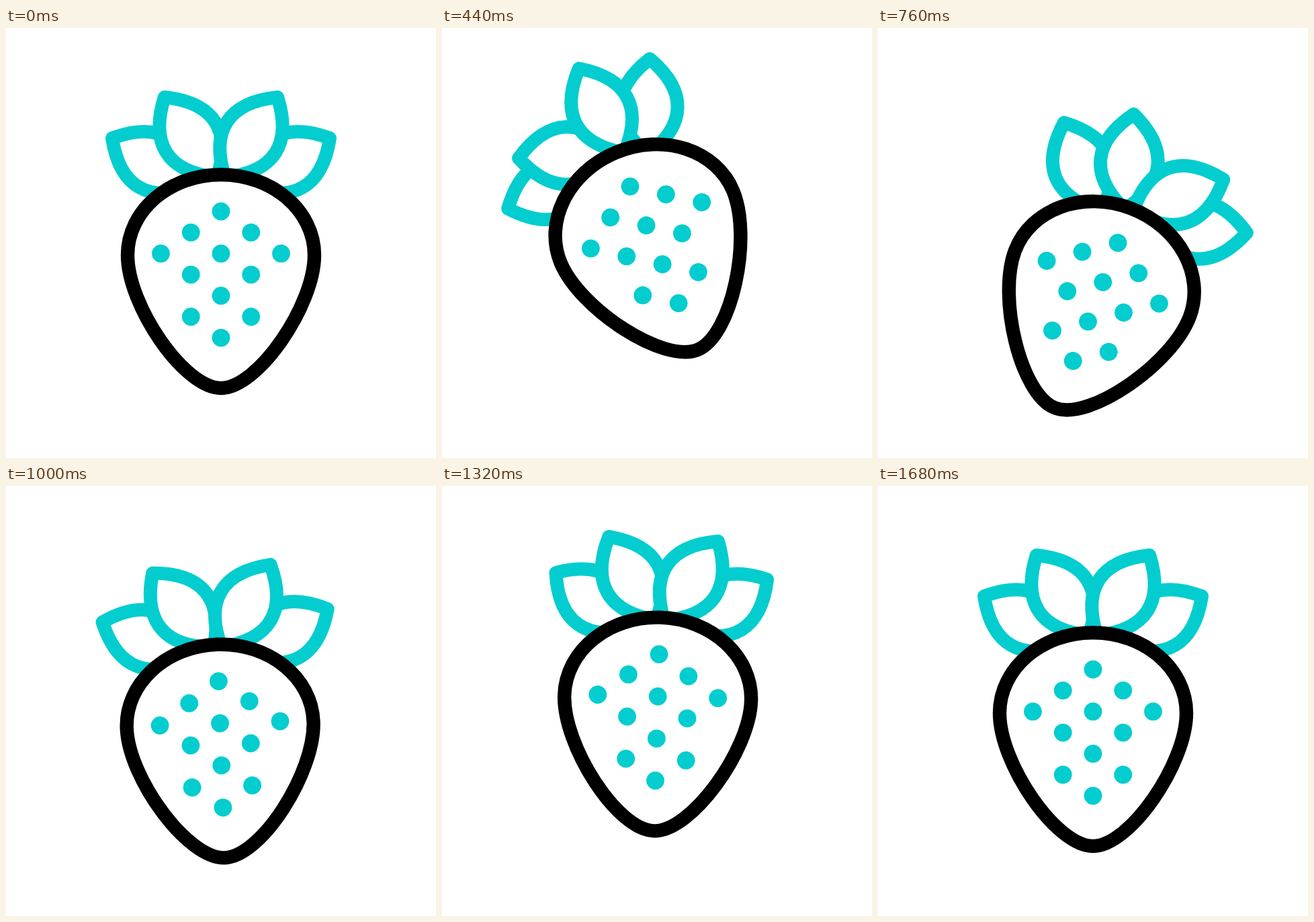
Animation, 640 px wide and 640 px high, one loop 2000 ms. Source, as an HTML page:

```html
<!DOCTYPE html>
<html lang="en">
<head>
<meta charset="utf-8">
<title>Strawberry</title>
<style>
  html, body { margin: 0; width: 100%; height: 100%; overflow: hidden; background: #fff; }
  svg { display: block; width: 100%; height: 100%; }
</style>
</head>
<body>
<svg viewBox="0 0 640 640">
  <g id="berry">
    <g id="leaves" fill="#fff" stroke="#03cdcf" stroke-width="20" stroke-linejoin="round"></g>
    <path fill="#fff" stroke="#000" stroke-width="20.4"
      d="M320 218.2C396.8 218.2 459 272 459 338C459 413 375 536 320 536C265 536 181 413 181 338C181 272 243.2 218.2 320 218.2Z"/>
    <g id="seeds" fill="#03cdcf"></g>
  </g>
</svg>
<script>
const LOOP = 2000, STEP = 40, CENTER = 320, PIVOT_Y = 377.3;
const LEAF = 'M0 8C-57 -38 -57 -88 0 -134.5C57 -88 57 -38 0 8Z';

// Body and leaves share one damped swing; the hop has its own, slower beat.
const SWING_BEATS = [0, 400, 760, 1120, 1400, 1615];
const TILT = [0, -23.9, 20.8, -9.6, 4.3, 0];
const FLAP = [0, -1, 0.46, -0.3, 0.135, 0];
const HOP_BEATS = [0, 440, 860, 1165, 1680];
const HOP = [0, -45.1, 53, -28.5, 0];

// The flap runs from the left leaf to the right one, building up a lead on the body.
const LAG = 33, LEAD = 34;
const OUTER = { offset: 46, y: 232, angle: 59.6, reach: 36.5, spread: 1.5 };
const INNER = { offset: 10.3, y: 215.4, angle: 33.3, reach: 39, spread: 0.5 };

const byId = id => document.getElementById(id);

function add(parent, name, attributes) {
  const node = document.createElementNS('http://www.w3.org/2000/svg', name);
  for (const key in attributes) node.setAttribute(key, attributes[key]);
  return parent.appendChild(node);
}

// Eases in and out from each value to the next.
function ease(time, beats, values) {
  const next = beats.findIndex(beat => beat > time);
  if (next < 1) return 0;
  const part = (time - beats[next - 1]) / (beats[next] - beats[next - 1]);
  const from = values[next - 1];
  return from + (values[next] - from) * (1 - Math.cos(Math.PI * part)) / 2;
}

const leaves = [];
for (const ring of [OUTER, INNER]) {
  for (const side of [-1, 1]) {
    leaves.push({ ring, side, node: add(byId('leaves'), 'path', { d: LEAF }) });
  }
}

for (let a = 0; a < 4; a++) {
  for (let b = 0; b < 4; b++) {
    if (Math.abs(a - b) > 1 && a + b !== 2) continue;
    add(byId('seeds'), 'circle', { cx: CENTER + (a - b) * 44.75, cy: 273 + (a + b) * 31.35, r: 13.4 });
  }
}

function draw(now) {
  const time = Math.floor(now % LOOP / STEP) * STEP;
  const hop = ease(time, HOP_BEATS, HOP);
  const tilt = ease(time, SWING_BEATS, TILT);
  byId('berry').setAttribute('transform', `translate(0 ${hop}) rotate(${tilt} ${CENTER} ${PIVOT_Y})`);

  for (const { ring, side, node } of leaves) {
    const own = time - LAG * (1.5 + side * ring.spread);
    const lead = LEAD * Math.min(1, own / SWING_BEATS[1]);
    const turn = side * ring.angle + ring.reach * ease(own + lead, SWING_BEATS, FLAP);
    node.setAttribute('transform', `translate(${CENTER + side * ring.offset} ${ring.y}) rotate(${turn})`);
  }
  requestAnimationFrame(draw);
}
draw(performance.now());
</script>
</body>
</html>
```
